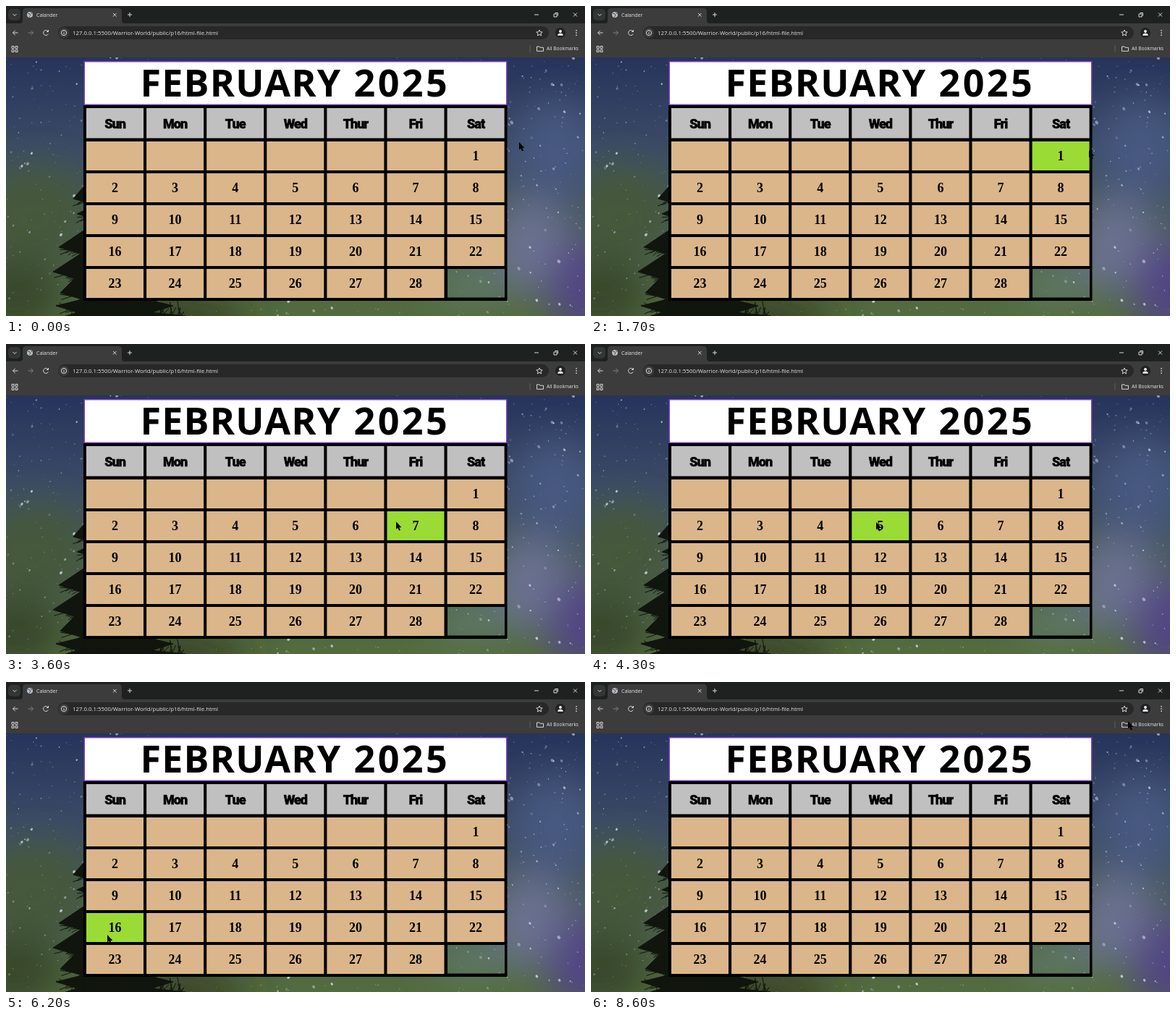
These frames come from a looping animation (800 by 428 pixels, 8700 ms). An HTML page:

```html
<!DOCTYPE html>
<html lang="en">
<head>
<meta charset="utf-8">
<title>Calander</title>
<style>
  html, body { margin: 0; width: 100%; height: 100%; overflow: hidden; background: #1f2020; }
  svg { display: block; width: 100%; height: 100%; }
  .ui { font-family: "Open Sans", "Noto Sans", sans-serif; fill: #e6e6e6; }
  .icon { fill: none; stroke: #d8d8d8; stroke-width: 1; }
  .heading { font: bold 52px "Open Sans", "Noto Sans", sans-serif; }
  .weekday { font: 900 18px Impact, Roboto, sans-serif; letter-spacing: -1px; stroke: #000; stroke-width: .5px; }
  .date { font: bold 18px "Liberation Serif", serif; }
  #days text { text-anchor: middle; }
</style>
</head>
<body>
<svg viewBox="0 0 800 428">
  <defs>
    <linearGradient id="sky" x1="0" y1="0" x2="0" y2="1">
      <stop offset="0" stop-color="#26345c"/>
      <stop offset=".35" stop-color="#3b4b66"/>
      <stop offset=".7" stop-color="#4d5f58"/>
      <stop offset="1" stop-color="#536c3c"/>
    </linearGradient>
    <filter id="soft" x="-50%" y="-50%" width="200%" height="200%"><feGaussianBlur stdDeviation="26"/></filter>
    <clipPath id="page"><rect y="71" width="800" height="357"/></clipPath>
  </defs>

  <g id="photo" clip-path="url(#page)">
    <rect y="71" width="800" height="357" fill="url(#sky)"/>
    <g filter="url(#soft)">
      <ellipse cx="40" cy="290" rx="80" ry="70" fill="#45583a"/>
      <ellipse cx="10" cy="400" rx="70" ry="50" fill="#38472b"/>
      <ellipse cx="760" cy="200" rx="60" ry="70" fill="#465880"/>
      <ellipse cx="725" cy="330" rx="55" ry="65" fill="#6b7190"/>
      <ellipse cx="800" cy="390" rx="50" ry="70" fill="#514584"/>
      <ellipse cx="640" cy="385" rx="50" ry="20" fill="#648071"/>
      <ellipse cx="230" cy="428" rx="110" ry="22" fill="#2f351d"/>
    </g>
    <g id="stars" fill="#dfe8ff"></g>
    <g id="tree" fill="#10150d" stroke="#10150d"></g>
  </g>

  <!-- browser frame -->
  <rect width="800" height="25" fill="#1f2020"/>
  <rect y="24" width="800" height="47" fill="#3c3c3c"/>
  <path d="M19 24q4 0 4-4V8q0-5 5-5H155q5 0 5 5v12q0 4 4 4z" fill="#3c3c3c"/>
  <rect x="3" y="4" width="17" height="16" rx="5" fill="#343535"/>
  <rect x="72" y="28" width="678" height="18" rx="9" fill="#282828"/>
  <circle cx="80" cy="37" r="7" fill="#3c3c3c"/>
  <g class="icon">
    <path d="M9.500 11l2.500 2.500 2.500-2.500M148 10l4.500 4.500m0-4.500l-4.500 4.500M168 12h6m-3-3v6"/>
    <path d="M730 12h6M757 11h4v4h-4zM758.500 9.500h4v4M784 9.500l5 5m0-5l-5 5"/>
    <path d="M16.500 37H9.500m3.200-3.200L9.500 37l3.200 3.200"/>
    <path d="M30.500 37h7m-3.200-3.200l3.200 3.200-3.200 3.200" stroke="#808080"/>
    <path d="M58 35a3.500 3.500 0 1 0 .3 3.500M58.500 33v2.500H56"/>
    <circle cx="80" cy="37" r="3.600"/><path d="M80 36.500v2.500M80 34.700v.9"/>
    <path d="M737 33l1.200 2.700 3 .3-2.300 2 .7 3-2.600-1.600-2.600 1.600.7-3-2.300-2 3-.3z"/>
    <path d="M8 55.500h3v3H8zM13 55.500h3v3h-3zM8 60.500h3v3H8zM13 60.500h3v3h-3z"/>
    <path d="M733.500 56h3.500l1 1.300h4.500v5h-9z"/>
    <path d="M724 54v10" stroke="#5c5c5c"/>
  </g>
  <circle cx="33" cy="12" r="4" fill="#b8bdc3"/>
  <path d="M30 10l3 1 1 2-2 2M34 8.500l2 2.500" fill="none" stroke="#4b5055"/>
  <circle cx="766" cy="37" r="7" fill="#202124"/>
  <circle cx="766" cy="35" r="1.900" fill="#fff"/><path d="M762.200 40.700q0-3 3.800-3t3.800 3z" fill="#fff"/>
  <path d="M787.300 33h1.500v1.500h-1.500zM787.300 36.300h1.500v1.500h-1.500zM787.300 39.600h1.500v1.500h-1.500z" fill="#ddd"/>
  <g class="ui">
    <text x="42" y="14.800" font-size="7">Calander</text>
    <text x="92" y="39.800" font-size="7.800">127.0.0.1:5500/Warrior-World/public/p16/html-file.html</text>
    <text x="747" y="61.300" font-size="6.600">All Bookmarks</text>
  </g>

  <!-- calendar -->
  <rect x="108.300" y="76.800" width="583.400" height="59.400" fill="#fff" stroke="#8040bd" stroke-width="1.400"/>
  <g class="heading">
    <text x="185.500" y="125" letter-spacing="1.200">FEBRUARY</text>
    <text x="480.500" y="125" letter-spacing="3.500">2025</text>
  </g>
  <path d="M107 137H692.500V407H107zM610 363V402.500H689V363z" fill-rule="evenodd"/>
  <g id="days"></g>

  <path id="cursor" d="M0 0V10.500L2.300 8.500 4 12.500 5.900 11.700 4.200 7.900H7.300z"/>
</svg>

<script>
const DURATION = 8700, STEP = 100;
const TAN = '#dab68a', GREEN = '#9bdb35', SILVER = '#c0c0c0';
const LEFT = 111, TOP = 187, COL = 83.1, ROW = 44, CELL_W = 79, CELL_H = 40;
const byId = id => document.getElementById(id);

function add(parent, name, attributes, content = '') {
  const node = document.createElementNS('http://www.w3.org/2000/svg', name);
  for (const key in attributes) node.setAttribute(key, attributes[key]);
  node.textContent = content;
  return parent.appendChild(node);
}

let seed = 16;
function random(min = 0, max = 1) {
  seed = (seed * 16807) % 2147483647;
  return min + (max - min) * seed / 2147483647;
}

function drawStars() {
  for (let i = 0; i < 850; i++) {
    const x = random(0, 800), y = random(71, 428);
    const size = 0.4 + 1.5 * random() ** 5 + (x > 690 ? 0.2 : 0);
    add(byId('stars'), 'ellipse', {
      rx: size * 1.3, ry: size, opacity: random(0.15, 0.8).toFixed(2),
      transform: `translate(${x} ${y}) rotate(${x > 400 ? 50 : -50})`
    });
  }
}

function drawTree() {
  const branches = [[93, 266], [98, 287], [73, 333], [65, 367], [75, 396], [69, 414]];
  const trunk = 150;
  let left = 'M150 200', right = '';
  for (const [x, y] of branches) {
    left += `L${x} ${y}L${x + 30} ${y + 9}`;
    right = `L${2 * trunk - x - 30} ${y + 9}L${2 * trunk - x} ${y}` + right;
    for (let i = 0; i < 18; i++) {
      const start = random(x, x + 45), level = y + (start - x) * 0.1;
      add(byId('tree'), 'path', { d: `M${start + 12} ${level + 4}l${random(-16, -5)} ${random(-9, 9)}` });
    }
  }
  add(byId('tree'), 'path', { d: `${left}L82 428H248${right}z` });
  for (let i = 0; i < 70; i++) {
    add(byId('tree'), 'path', { d: `M${random(85, 245)} 430l${random(-12, 12)} ${random(-24, -8)}` });
  }
}

function addCell(column, y, height, fill, label, style) {
  const x = LEFT + column * COL;
  const cell = add(byId('days'), 'rect', { x, y, width: CELL_W, height, fill });
  add(byId('days'), 'text', { x: x + CELL_W / 2, y: y + (style === 'date' ? 26 : 27.5), class: style }, label);
  return cell;
}

drawStars();
drawTree();
['Sun', 'Mon', 'Tue', 'Wed', 'Thur', 'Fri', 'Sat']
  .forEach((name, column) => addCell(column, 141, 41.5, SILVER, name, 'weekday'));
const cells = Array.from({ length: 34 }, (_, i) =>
  addCell(i % 7, TOP + Math.floor(i / 7) * ROW, CELL_H, TAN, i < 6 ? '' : i - 5, 'date'));

// Pointer path as [time, x, y]
const pointerPath = [
  [0, 709, 188], [1700, 688, 199], [2800, 644, 215], [3200, 622, 245],
  [4300, 394, 246], [5400, 158, 256], [6200, 140, 349], [6800, 430, 342],
  [7400, 798, 280], [8600, 742, 54], [8700, 742, 54]
];

function pointerAt(time) {
  const next = pointerPath.findIndex(point => point[0] > time);
  const [t0, x0, y0] = pointerPath[next - 1], [t1, x1, y1] = pointerPath[next];
  const progress = (time - t0) / (t1 - t0);
  return [x0 + (x1 - x0) * progress, y0 + (y1 - y0) * progress];
}

function render(now) {
  const time = Math.floor(now % DURATION / STEP) * STEP;
  const [x, y] = pointerAt(time);
  byId('cursor').setAttribute('transform', `translate(${x} ${y})`);
  cells.forEach((cell, i) => {
    const dx = x - LEFT - i % 7 * COL, dy = y - TOP - Math.floor(i / 7) * ROW;
    const hovered = dx >= 0 && dx <= CELL_W && dy >= 0 && dy <= CELL_H;
    cell.setAttribute('fill', hovered ? GREEN : TAN);
  });
}

const start = performance.now();
function tick() {
  render(performance.now() - start);
  requestAnimationFrame(tick);
}
tick();
</script>
</body>
</html>
```
